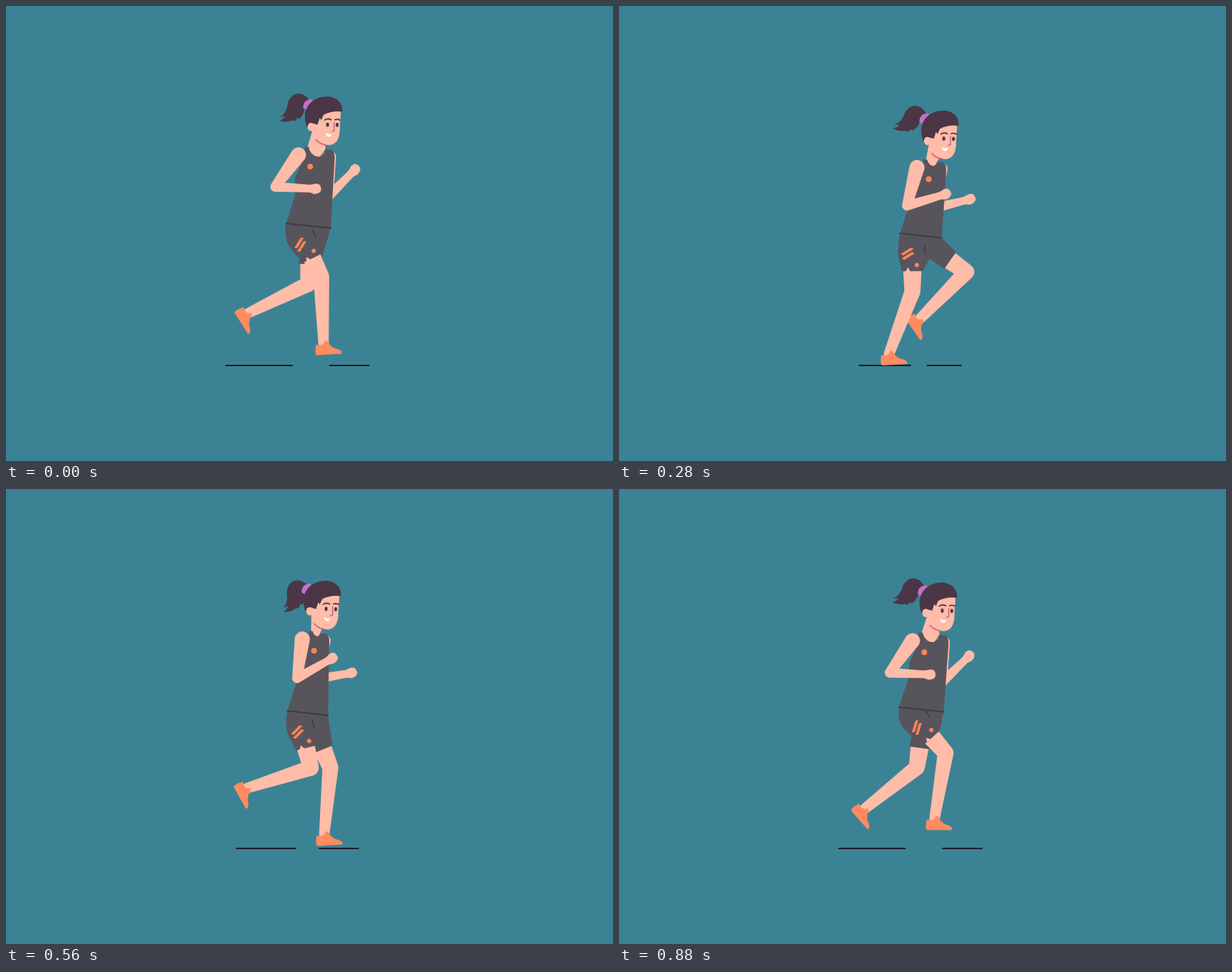
These frames come from a looping animation (800x600 px, 0.92 s). An HTML page:

```html
<!DOCTYPE html>
<html lang="en">
<head>
<meta charset="utf-8">
<title>Runner</title>
<style>
html, body { margin: 0; width: 100%; height: 100%; overflow: hidden; background: #3b8394; }
svg { display: block; width: 100vw; height: 100vh; }
.skin { fill: #ffbca8; }
.hair { fill: #4a3646; }
.shoe { fill: #ff8b5e; }
.mark { fill: #fb8458; }
.cloth { fill: #58545c; }
.line { fill: none; stroke-linecap: round; }
</style>
</head>
<body>
<svg viewBox="0 0 800 600">
  <path id="ground" class="line" stroke="#20212d" stroke-width="2"/>
  <path id="farArm" class="skin"/>
  <path id="farHand" class="skin"/>
  <path id="farLeg" class="skin"/>
  <path id="farShoe" class="shoe"/>
  <path id="farShorts" class="cloth"/>
  <path id="nearLeg" class="skin"/>
  <path id="nearShoe" class="shoe"/>
  <path id="nearShorts" class="cloth"/>
  <g id="trim">
    <path class="line" stroke="#403c45" stroke-width="1.6" d="M16.5 5.5V16"/>
    <path class="mark" transform="translate(-5.5 15) rotate(148)" d="M-9 .5L7 .5L9 4L-7 4ZM-7 -5L9 -5L11 -1.5L-5 -1.5Z"/>
    <circle class="mark" cx="6" cy="31" r="2.8"/>
  </g>
  <path id="neck" class="skin"/>
  <path id="shirt" class="cloth"/>
  <path id="waist" class="line" stroke="#403c45" stroke-width="2"/>
  <circle id="badge" class="mark" r="3.8"/>
  <path id="nearArm" class="skin"/>
  <path id="nearHand" class="skin"/>
  <g id="head">
    <path id="tail" class="hair" d="M399 122Q390 110 379 115Q371 120 370 130Q367 140 360 143L367 142.5Q364 147 359 148Q369 152 377 148L377 150Q381 149 383 145L385 147Q391 142 393 133Z"/>
    <path fill="#c36fc9" d="M402 121.5Q391 122 391 133L397 137L404 124Z"/>
    <path class="skin" d="M403 145L441 134L439.5 158Q440 182 424 182Q411 180 404 165Z"/>
    <path class="line" stroke="#c4607f" stroke-width="1.5" d="M407.5 174.5Q413 180.5 420 181.5"/>
    <path class="hair" d="M396 158Q389 138 401 126Q411 117 426 118Q443 121 443 138Q429 136 418 142L415 149L413 146L410 155L403 153L398 158Z"/>
    <ellipse class="skin" cx="401.5" cy="158" rx="4.5" ry="5.5"/>
    <ellipse class="hair" cx="423.3" cy="155" rx="1.9" ry="2.8"/>
    <ellipse class="hair" cx="436" cy="155.3" rx="1.9" ry="2.8"/>
    <path class="line" stroke="#4a3646" stroke-width="1.7" d="M419.5 149Q423 146 428 148.5M433 148.5Q436 147 440 149"/>
    <path class="line" stroke="#b85a7a" stroke-width="1.2" d="M432 152V163L429 164"/>
    <path fill="#fff" d="M420.5 165.5Q424 168.5 429 167Q427.5 171.5 424 171Q421 169.5 420.5 165.5Z"/>
  </g>
</svg>
<script>
const LOOP = 920, STEP = 40, FLOOR = 459;
const SHIN = 88.5;

// Stride of one leg: time, thigh angle, shin angle, shoe tilt.
const GAIT = [
  [0, 26, 2, 0],
  [170, 19, -12, 0],
  [290, -1, -22, 0],
  [430, -8, -54, 56],
  [470, -1, -66, 62],
  [630, 26, -71, 64],
  [750, 56, -42, 56],
  [890, 40, -7, 0]
];

const HAND = "M-9 -4.5L-2 -6Q1 -8 6 -6Q9 -3 8.5 2Q6 7 -1 6.8L-9 4Z";
const SHOE = "M-10 1Q-4 3 0 0Q1 -5 5 -4L7 0Q12 6 19 7Q25 9 24 13L-9 15Q-12 14 -10 1Z";

const $ = id => document.getElementById(id);
const set = (id, name, value) => $(id).setAttribute(name, value);
const draw = (id, d) => set(id, "d", d);
const add = (p, x, y) => [p[0] + x, p[1] + y];
const mix = (a, b, k) => [a[0] + (b[0] - a[0]) * k, a[1] + (b[1] - a[1]) * k];
const pt = p => p[0].toFixed(2) + " " + p[1].toFixed(2);
const poly = pts => "M" + pts.map(pt).join("L") + "Z";
const place = (p, turn = 0) => `translate(${pt(p)}) rotate(${turn.toFixed(2)})`;
const rad = deg => deg * Math.PI / 180;
const wave = (t, turns = 1, delay = 0) => Math.cos(2 * Math.PI * turns * (t - delay) / LOOP);

// Point at "along" down a limb hanging at an angle, "front" to its forward side.
function reach(p, deg, along, front = 0) {
  const s = Math.sin(rad(deg)), c = Math.cos(rad(deg));
  return add(p, along * s + front * c, along * c - front * s);
}

// Smooth periodic curve through the stride.
function stride(time) {
  const t = time % LOOP, n = GAIT.length;
  const i = GAIT.findLastIndex(row => row[0] <= t);
  const row = k => GAIT[(k + n) % n];
  const [t0, t1, t2, t3] = [i - 1, i, i + 1, i + 2].map(k => row(k)[0] + LOOP * Math.floor(k / n));
  const span = t2 - t1, u = (t - t1) / span, v = 1 - u;
  return [1, 2, 3].map(c => {
    const a = row(i)[c], b = row(i + 1)[c];
    const m1 = (b - row(i - 1)[c]) / (t2 - t0) * span;
    const m2 = (row(i + 2)[c] - a) / (t3 - t1) * span;
    return a * (1 + 2 * u) * v * v + m1 * u * v * v + b * u * u * (3 - 2 * u) - m2 * u * u * v;
  });
}

// Tapered chain of rounded segments.
function limb(pts, radii) {
  let d = "";
  for (let i = 0; i < pts.length - 1; i++) {
    const a = pts[i], b = pts[i + 1], ra = radii[i], rb = radii[i + 1];
    const len = Math.hypot(b[0] - a[0], b[1] - a[1]);
    const nx = (a[1] - b[1]) / len, ny = (b[0] - a[0]) / len;
    d += `M${pt(add(a, nx * ra, ny * ra))}L${pt(add(b, nx * rb, ny * rb))}` +
      `A${rb} ${rb} 0 0 0 ${pt(add(b, -nx * rb, -ny * rb))}` +
      `L${pt(add(a, -nx * ra, -ny * ra))}A${ra} ${ra} 0 0 0 ${pt(add(a, nx * ra, ny * ra))}Z`;
  }
  return d;
}

function drawArm(name, shoulder, top, back, lift, fore) {
  const elbow = reach(shoulder, -back, 52);
  const hand = reach(elbow, 90 + lift, fore);
  draw(name + "Arm", limb([shoulder, elbow, hand], [top, 6.5, 4.8]));
  set(name + "Hand", "transform", place(hand, -lift));
}

function drawLeg(name, t, hip, length, cuff) {
  const [thigh, shin, tilt] = stride(t);
  const knee = reach(hip, thigh, length);
  const ankle = reach(knee, shin, SHIN);
  ankle[1] = Math.min(FLOOR, ankle[1]);
  draw(name + "Leg", limb([reach(hip, thigh, cuff), knee, ankle], [12, 10.5, 6.8]));
  set(name + "Shoe", "transform", place(ankle, Math.max(0, tilt)));
  return { hip, thigh, cuff, rear: reach(hip, thigh, cuff, -13.5), front: reach(hip, thigh, cuff, 13.5) };
}

function drawShorts(near, far, wl, wr) {
  const { hip, thigh, cuff, rear, front } = near;
  draw("farShorts", poly([wl, add(wl, 20, 20), far.rear, far.front, wr]));
  draw("nearShorts", `M${pt(wl)}C${pt(add(wl, -5, 28))} ${pt(reach(hip, thigh, cuff - 19, -18))} ${pt(rear)}` +
    `L${pt(mix(rear, front, .18))}L${pt(reach(hip, thigh, cuff - 5, -6))}` +
    `L${pt(mix(rear, front, .4))}L${pt(front)}L${pt(wr)}Z`);
  set("trim", "transform", place(hip, -thigh));
}

function drawTorso(head, strap, side, wl, wr) {
  const inner = add(strap, 5, 0), throat = add(side, -9, -1);
  const dip = .68 * (throat[0] - inner[0]);
  draw("neck", poly([add(head, 404, 160), add(head, 420, 176), throat, add(strap, 17, 17), add(strap, 3, 2)]));
  draw("shirt", `M${pt(strap)}L${pt(inner)}C${pt(add(inner, 2, dip))} ${pt(add(throat, -2, dip))} ${pt(throat)}` +
    `L${pt(side)}Q${pt(add(side, 4, 4))} ${pt(add(side, 3, 14))}L${pt(wr)}L${pt(wl)}` +
    `L${pt(add(wl, 12, -37))}L${pt(add(strap, -13, 40))}Q${pt(add(strap, -1, 20))} ${pt(strap)}Z`);
  draw("waist", `M${pt(wl)}L${pt(wr)}`);
  set("badge", "transform", place(add(strap, 7, 26)));
}

function render(t) {
  const swing = wave(t), sway = wave(t, 2, 110), step = wave(t, 2, -20);

  const head = [1.8 - 4 * sway - swing, 10 - 10 * wave(t, 2, 40)];
  const lean = .6 * (head[0] - 1.8), sink = .9 * head[1];
  const strap = [398.2 - 3.5 * swing + lean, 184.5 + sink];
  const side = [427.4 + 3.3 * swing + lean, 188.5 + sink];
  const hips = 294 - 7.3 * wave(t, 2);
  const wl = [370 - swing, hips], wr = [426 + 2 * swing, hips + 6];

  draw("ground", `M${306 - 22 * step + 5 * swing} 474H${381.5 - 4.5 * step}` +
    `M${414 + 13 * step} 474H${462 + 22 * step - 5 * swing}`);

  const bend = 8 * swing * swing;
  drawArm("far", add(side, -4, 9), 9, 8 - 7 * swing, 19 + 18 * swing + bend, 48);
  drawArm("near", add(strap, -8.5, 10.5), 10, 20 + 16 * swing, 9 - 20 * swing + bend, 52);

  const far = drawLeg("far", t + LOOP / 2, [402, hips + 12], 68, 42);
  const near = drawLeg("near", t, [386.5, hips + 11], 66, 39);
  drawShorts(near, far, wl, wr);
  drawTorso(head, strap, side, wl, wr);
  set("head", "transform", place(head));
  set("tail", "transform", `rotate(${(-1.5 - 17 * sway).toFixed(2)} 397 128)`);
}

for (const name of ["near", "far"]) {
  draw(name + "Hand", HAND);
  draw(name + "Shoe", SHOE);
}

const start = performance.now();
function tick() {
  const t = (performance.now() - start) % LOOP;
  render(Math.floor(t / STEP) * STEP);
  requestAnimationFrame(tick);
}
tick();
</script>
</body>
</html>
```
